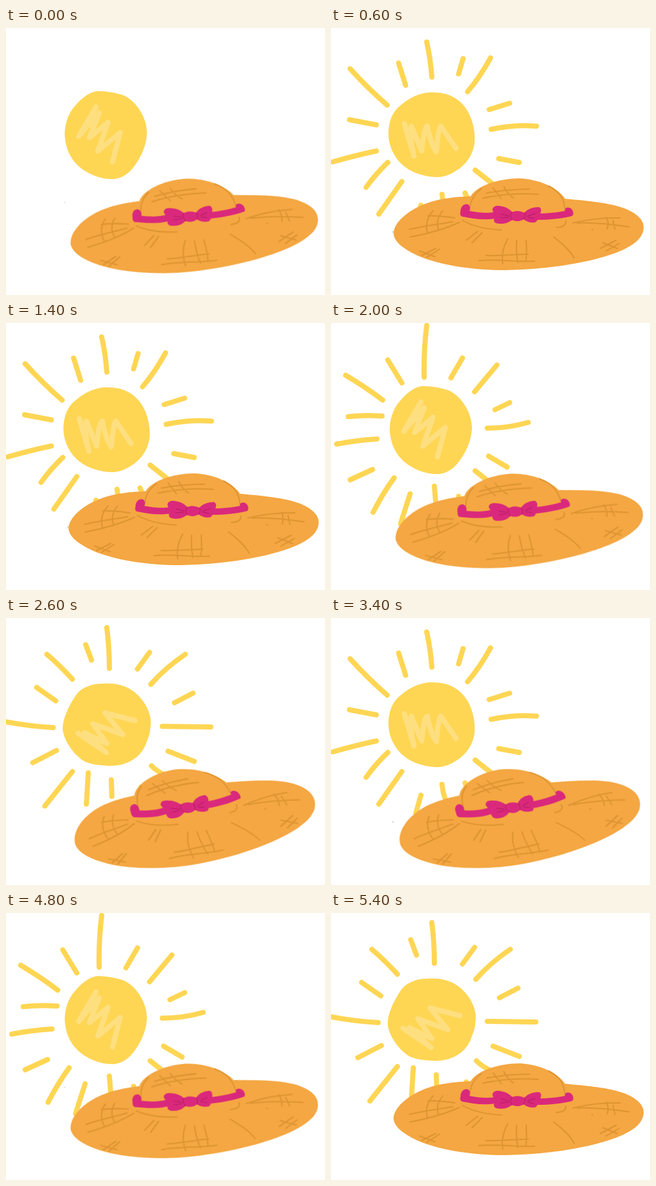
Write an HTML page without scripts that moves like this. It is 500 px wide and 419 px high and loops after 5600 ms.

```html
<!DOCTYPE html>
<html lang="en">
<head>
<meta charset="utf-8">
<title>Sun and straw hat</title>
<style>
html, body { margin: 0; width: 100%; height: 100%; overflow: hidden; background: #fff; }
svg { display: block; width: 100%; height: 100%; }
path { stroke-linecap: round; stroke-linejoin: round; }

.disc { fill: #fed654; }
.shine { fill: none; stroke: #fedf80; stroke-width: 8; }
.rays { fill: none; stroke: #fed654; stroke-width: 8; animation: grow 2.8s step-end infinite; }
.speck { fill: #b9c4cc; }
.straw { fill: #f4a742; }
.weave { fill: none; stroke: #dd9431; stroke-width: 2; }
.ribbon { fill: #da297c; }
.fold { fill: none; stroke: #bd1f69; stroke-width: 1.4; }

/* the sun runs 14 steps of 200 ms, the hat rocks in 4 */
.mid { animation: mid .4s step-end infinite; }
.left { animation: left 2.8s step-end infinite; }
.right { animation: right 2.8s step-end infinite; }
.hat { transform-origin: 0 0; animation: rock .8s step-end infinite; }

@keyframes mid { 0% { opacity: 1 } 50%, 100% { opacity: 0 } }
@keyframes left {
  0%, 14.285%, 42.857%, 71.428% { opacity: 0 }
  7.142%, 35.714%, 64.285%, 92.857%, 100% { opacity: 1 }
}
@keyframes right {
  0%, 28.571%, 57.142%, 85.714%, 100% { opacity: 0 }
  21.428%, 50%, 78.571% { opacity: 1 }
}
@keyframes grow {
  0% { opacity: 0; stroke-dasharray: 0 2 }
  7.142% { opacity: 1; stroke-dasharray: .4 2 }
  14.285% { opacity: 1; stroke-dasharray: .75 2 }
  21.428%, 100% { opacity: 1; stroke-dasharray: 2 0 }
}
@keyframes rock {
  0%, 50% { transform: matrix(.992, -.09, .215, 1, -64.9, 27.2) }
  25% { transform: matrix(.962, -.166, .42, 1, -120.4, 51) }
  75%, 100% { transform: none }
}
</style>
</head>
<body>
<svg viewBox="0 0 500 419" preserveAspectRatio="none">

<g class="mid">
  <g class="rays">
    <path pathLength="1" d="M146 85Q145 45 150 4"/>
    <path pathLength="1" d="M111 94L89 58"/>
    <path pathLength="1" d="M81 121Q55 101 23 82"/>
    <path pathLength="1" d="M80 146Q52 144 27 147"/>
    <path pathLength="1" d="M72 182Q40 184 9 190"/>
    <path pathLength="1" d="M65 230L30 246"/>
    <path pathLength="1" d="M99 243Q82 266 66 297"/>
    <path pathLength="1" d="M124 268L109 315"/>
    <path pathLength="1" d="M162 256L164 280"/>
    <path pathLength="1" d="M200 272L203 288"/>
    <path pathLength="1" d="M226 232L245 247"/>
    <path pathLength="1" d="M247 209L276 226"/>
    <path pathLength="1" d="M245 165Q278 165 309 156"/>
    <path pathLength="1" d="M257 136L280 125"/>
    <path pathLength="1" d="M225 108L260 66"/>
    <path pathLength="1" d="M188 86L206 55"/>
  </g>
  <path class="disc" d="M145 99C158 99 174 102 185 106C206 116 221 142 221 165C220 184 212 204 197 222C186 234 174 238 163 237C142 236 121 225 110 213C98 201 92 182 92 165C93 145 100 130 112 118C122 107 134 99 145 99Z"/>
  <path class="shine" d="M141 124L114 170L146 133L131 172L160 148L144 193L179 164L167 210"/>
  <circle class="speck" cx="92" cy="274" r=".8"/>
</g>

<g class="right">
  <g class="rays">
    <path pathLength="1" d="M158 77Q156 48 150 22"/>
    <path pathLength="1" d="M117 90L106 55"/>
    <path pathLength="1" d="M88 121Q58 95 30 64"/>
    <path pathLength="1" d="M71 152L29 144"/>
    <path pathLength="1" d="M71 193Q38 200 3 210"/>
    <path pathLength="1" d="M89 211Q70 229 55 250"/>
    <path pathLength="1" d="M111 241L75 292"/>
    <path pathLength="1" d="M141 278L133 306"/>
    <path pathLength="1" d="M174 261Q175 273 179 284"/>
    <path pathLength="1" d="M210 259L216 272"/>
    <path pathLength="1" d="M226 223L255 246"/>
    <path pathLength="1" d="M263 205L295 211"/>
    <path pathLength="1" d="M251 159Q288 151 322 154"/>
    <path pathLength="1" d="M248 128L280 118"/>
    <path pathLength="1" d="M214 100Q233 78 250 47"/>
    <path pathLength="1" d="M200 72L207 48"/>
  </g>
  <path class="disc" d="M155 101C168 101 178 102 187 106C203 113 214 126 220 143C225 157 226 172 225 180C222 204 206 221 185 230C176 234 170 234 163 234C143 233 122 225 110 213C97 200 90 183 90 165C91 142 98 129 112 119C125 108 140 102 155 101Z"/>
  <path class="shine" d="M115 150L130 201Q122 165 126 154L142 193Q146 154 151 154Q156 181 165 194Q168 160 172 154L196 189"/>
  <circle class="speck" cx="97" cy="320" r="1.1"/>
</g>

<g class="left">
  <g class="rays">
    <path pathLength="1" d="M162 79Q162 46 158 15"/>
    <path pathLength="1" d="M134 66L125 42"/>
    <path pathLength="1" d="M104 96Q84 74 64 57"/>
    <path pathLength="1" d="M78 130L48 109"/>
    <path pathLength="1" d="M74 172Q37 170 0 163"/>
    <path pathLength="1" d="M79 208L42 227"/>
    <path pathLength="1" d="M104 241L61 295"/>
    <path pathLength="1" d="M129 243L126 292"/>
    <path pathLength="1" d="M165 254L166 280"/>
    <path pathLength="1" d="M212 265L215 274"/>
    <path pathLength="1" d="M228 232Q237 241 250 247"/>
    <path pathLength="1" d="M254 209L295 225"/>
    <path pathLength="1" d="M245 170L321 171"/>
    <path pathLength="1" d="M264 133L293 118"/>
    <path pathLength="1" d="M227 104Q251 77 281 57"/>
    <path pathLength="1" d="M206 80L225 54"/>
  </g>
  <path class="disc" d="M150 103C164 102 175 103 185 107C208 115 228 143 227 165C226 178 225 184 222 190C217 209 205 221 190 227C181 231 171 232 160 232C147 231 135 230 125 226C106 216 91 192 89 176C88 160 98 137 112 118C120 109 135 103 150 103Z"/>
  <path class="shine" d="M113 181L157 211L123 180L158 197L136 166L183 183L155 149L202 161"/>
</g>

<g class="hat">
  <path class="straw" d="M98 321C101 300 128 283 150 275C172 267 196 265 219 264C228 248 262 236 295 236C325 237 355 250 367 268C400 271 436 274 460 283C480 291 491 302 490 314C489 331 472 343 446 353C400 370 330 380 262 380C215 379 170 371 140 359C115 348 98 336 98 321Z"/>
  <g class="weave">
    <path d="M217 285C219 268 226 259 236 252M341 248C356 255 366 266 367 287"/>
    <path d="M238 267C265 261 297 259 325 261M244 259C265 255 290 253 311 253M254 251L267 268M271 249Q276 260 286 267"/>
    <path d="M160 287C150 297 148 310 151 320M175 287C167 297 165 308 169 317M152 295C165 294 180 296 194 298M123 316C145 310 170 308 191 304M124 328C150 323 178 316 201 305"/>
    <path d="M206 302C222 311 245 316 267 317M212 333L230 319M221 337L237 321"/>
    <path d="M139 350L163 359M142 357L164 346M150 360L170 347"/>
    <path d="M232 365C260 362 295 368 319 366M243 357C265 358 290 355 309 355M277 331C270 343 267 356 269 370M291 333C290 345 291 358 293 368M306 333C306 345 308 356 305 366"/>
    <path d="M349 328C362 338 374 348 381 361M368 303C369 311 360 313 353 313M379 306C410 299 430 298 453 298M386 306C415 305 440 308 467 312M432 297Q436 306 433 315M442 302L445 316M409 316.5h1"/>
    <path d="M422 346L447 333M426 337L449 346M431 350L452 338"/>
  </g>
  <g class="ribbon">
    <path d="M203 288C203 280 209 275 215 277C219 280 218 284 217 287C232 290 245 291 256 289L258 299C238 302 222 299 206 296C202 295 202 291 203 288Z"/>
    <path d="M324 291C342 291 356 289 367 287C365 282 373 280 377 284C380 287 381 293 378 295C362 299 342 301 324 301Z"/>
    <path d="M253 285C254 279 261 278 268 280C275 281 281 285 284 289C290 286 298 287 303 290C308 284 317 281 326 281C331 283 329 289 328 291C326 297 324 303 320 305C313 306 306 304 302 300C297 304 288 304 284 301C279 305 272 308 264 307C256 307 254 303 256 297C257 293 254 289 253 285Z"/>
  </g>
  <path class="fold" d="M284 289Q279 294 284 301M303 290Q306 295 302 300M267 292L279 295M266 298L278 297M309 295L320 291M309 297L318 299"/>
</g>

</svg>
</body>
</html>
```
